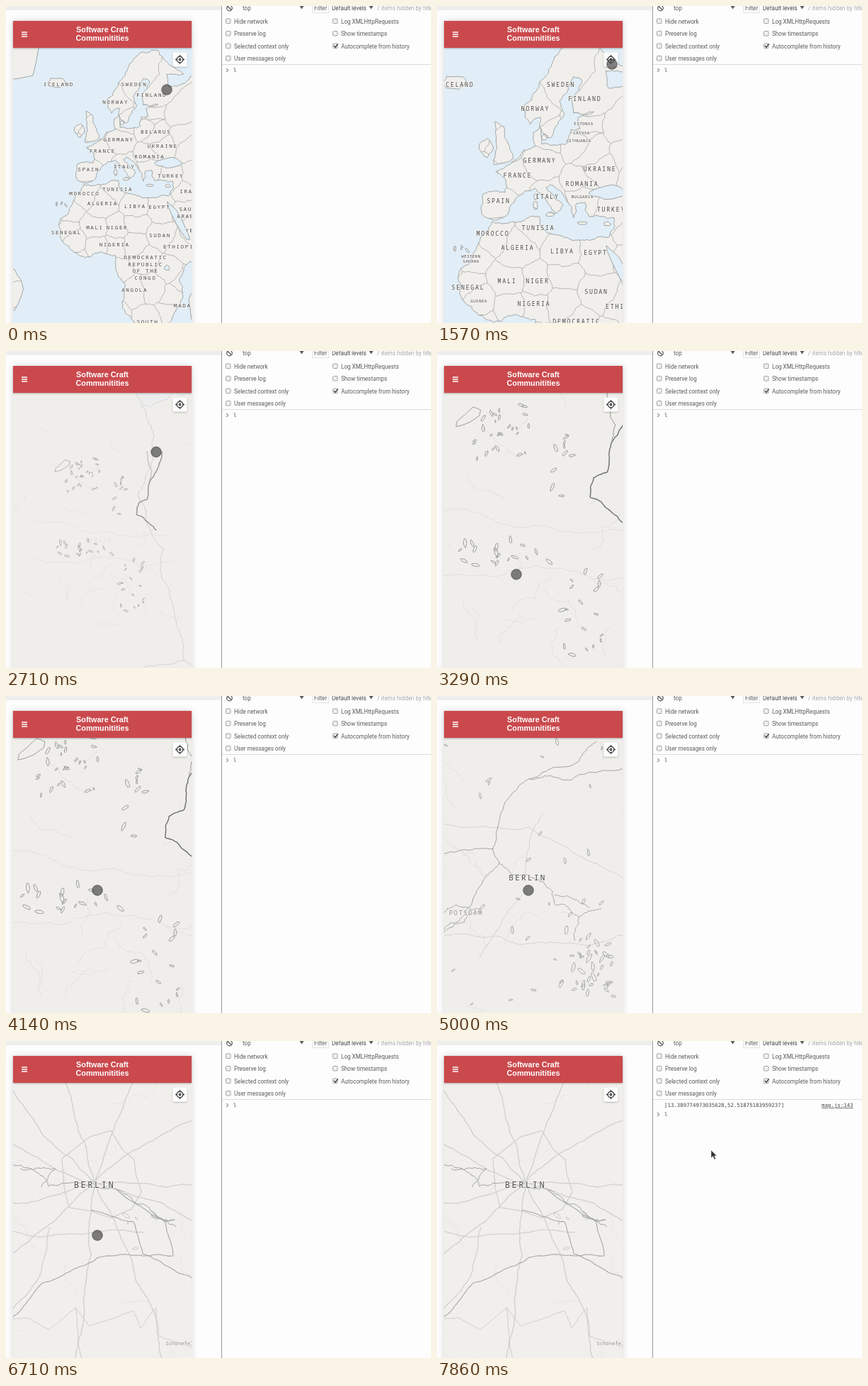
An HTML page with a canvas for the animation above (8 s loop, 600x447 px).

```html
<!DOCTYPE html>
<html lang="en">
<head>
<meta charset="utf-8">
<title>Map zoom</title>
<style>
html, body { margin: 0; width: 100%; height: 100%; overflow: hidden; background: #fdfdfd; }
canvas, svg { position: absolute; left: 0; top: 0; width: 600px; height: 447px; }
.ui { font: 8.15px Roboto, sans-serif; fill: #5c5c5c; }
.mono { font: 7.4px "DejaVu Sans Mono", monospace; fill: #444; }
.title { font: bold 10.8px "Liberation Sans", Arial, sans-serif; fill: #fff; text-anchor: middle; }
</style>
</head>
<body>
<canvas id="map" width="600" height="447"></canvas>
<svg viewBox="0 0 600 447">
  <defs><filter id="soft" x="-20%" y="-20%" width="140%" height="150%"><feDropShadow dx="0" dy="1" stdDeviation="1" flood-opacity=".3"/></filter></defs>
  <rect width="304" height="6" fill="#eeeeed"/>
  <rect x="10" y="21" width="252" height="38" fill="#ca4a4d" filter="url(#soft)"/>
  <path d="M22 37h8M22 40h8M22 43h8" stroke="#fff" stroke-width="1.4"/>
  <text class="title" x="136" y="37">Software Craft</text>
  <text class="title" x="136" y="49.3">Communitities</text>
  <rect x="235.5" y="65.5" width="20" height="20" rx="2" fill="#fdfdfd" filter="url(#soft)"/>
  <g transform="translate(245.5 75.5)" fill="none" stroke="#3c3c3c" stroke-width="1.4">
    <circle r="4.3"/>
    <path d="M0 -6.5v2.500M0 4v2.500M-6.500 0h2.500M4 0h2.500"/>
    <circle r="1.2"/>
  </g>
  <path d="M304.5 0V447" stroke="#9b9b9b"/>
  <path d="M305 82.5H600" stroke="#dcdcdc"/>
  <g class="ui">
    <circle cx="315.5" cy="3" r="3.8" fill="none" stroke="#555" stroke-width="1.2"/>
    <path d="M313 .5l5 5" stroke="#555" stroke-width="1.2"/>
    <text x="334" y="6">top</text>
    <rect x="432.5" y="-6" width="23" height="15.5" fill="none" stroke="#e2e2e2"/>
    <text x="435" y="6">Filter</text>
    <text x="460" y="6" fill="#444">Default levels</text>
    <path d="M414.5 0h6l-3 4.5zM512.5 0h6l-3 4.5z"/>
    <text x="523" y="6" fill="#a5a5a5">7 items hidden by filters</text>
    <g id="options"></g>
  </g>
  <g id="log" class="mono">
    <text x="321" y="93">[13.389774973035628,52.51875183959237]</text>
    <text x="543" y="93" text-decoration="underline">map.js:143</text>
  </g>
  <g id="prompt" class="mono">
    <path d="M311 88l3 2.5l-3 2.5" fill="none" stroke="#666"/>
    <text x="321" y="93">l</text>
  </g>
  <circle id="touch" r="7.3" fill="#444" fill-opacity=".68" stroke="#333" stroke-opacity=".6"/>
  <path id="arrow" d="M0 0v11l2.6-2.4l2 4.4l1.9-.9l-2-4.2h3.4z" fill="#333" stroke="#eee" stroke-width=".5"/>
</svg>
<script>
const $ = id => document.getElementById(id);
const ctx = $('map').getContext('2d');
const STEP = 1000 / 7, STEPS = 56;
const LAND = '#f1efeb', SEA = '#e1eef7', LINE = '#8f9294', FAINT = '#dcdbd8', ROAD = '#cfcfcd', RIVER = '#9fa2a3';

let seed = 7;
const random = () => {
  seed = (seed * 1664525 + 1013904223) % 4294967296;
  return seed / 4294967296;
};
const spread = size => (random() - .5) * size;

// Midpoint displacement makes a few key points look like natural lines.
function roughen(points, amount) {
  const out = [points[0]];
  const split = (a, b) => {
    const dx = b[0] - a[0], dy = b[1] - a[1];
    if (Math.hypot(dx, dy) < 3) return out.push(b);
    const k = spread(amount);
    const mid = [(a[0] + b[0]) / 2 - dy * k, (a[1] + b[1]) / 2 + dx * k];
    split(a, mid);
    split(mid, b);
  };
  for (let i = 1; i < points.length; i++) split(points[i - 1], points[i]);
  return out;
}

const trace = (path, points) => points.forEach(([x, y], i) => i ? path.lineTo(x, y) : path.moveTo(x, y));

// "x,y x,y; x,y ..." becomes rough lines
function shape(text, amount, { closed = false, project = p => p, path = new Path2D() } = {}) {
  for (const part of text.trim().split(';')) {
    const points = part.trim().split(/\s+/).map(p => project(p.split(',').map(Number)));
    if (closed) points.push(points[0]);
    trace(path, roughen(points, amount));
  }
  return path;
}

function blob(path, x, y, rx, ry, turn = 0, corners = 14) {
  const points = Array.from({ length: corners }, (_, i) => {
    const a = i / corners * 2 * Math.PI, r = .8 + random() * .4;
    const u = Math.cos(a) * rx * r, v = Math.sin(a) * ry * r;
    return [x + u * Math.cos(turn) - v * Math.sin(turn), y + u * Math.sin(turn) + v * Math.cos(turn)];
  });
  trace(path, points);
  path.closePath();
  return path;
}

function lakes(path, count, x, y, width, height, size) {
  for (let n = 0; n < count; n++) {
    const long = size * (.5 + random());
    blob(path, x + spread(width), y + spread(height), long, long * .35, random() * 3, 9);
  }
  return path;
}

function streams(count) {
  const path = new Path2D();
  for (let n = 0; n < count; n++) {
    const x = 130 + spread(420), y = 250 + spread(560);
    trace(path, roughen([[x, y], [x + spread(120), y + spread(120)]], .5));
  }
  return path;
}

function rays(x, y, count, length) {
  const path = new Path2D();
  for (let n = 0; n < count; n++) {
    const a = (n + spread(.5)) / count * 2 * Math.PI;
    trace(path, roughen([[x, y], [x + Math.cos(a) * length, y + Math.sin(a) * length]], .12));
  }
  return path;
}

// Borders run halfway between neighbouring centres (Voronoi cells).
function borders(sites) {
  const path = new Path2D();
  const box = [[-200, -100], [500, -100], [500, 800], [-200, 800]];
  sites.forEach((a, i) => {
    let cell = box.map(p => ({ p, owner: -1 }));
    sites.forEach((b, j) => {
      if (i === j) return;
      const side = ([x, y]) => (x - (a.x + b.x) / 2) * (b.x - a.x) + (y - (a.y + b.y) / 2) * (b.y - a.y);
      const kept = [];
      cell.forEach((c, k) => {
        const d = cell[(k + 1) % cell.length], s = side(c.p), t = side(d.p);
        if (s <= 0) kept.push(c);
        if (s <= 0 === t <= 0) return;
        const u = s / (s - t);
        kept.push({ p: c.p.map((v, n) => v + (d.p[n] - v) * u), owner: s <= 0 ? j : c.owner });
      });
      cell = kept;
    });
    cell.forEach((c, k) => {
      if (c.owner > i) trace(path, roughen([c.p, cell[(k + 1) % cell.length].p], .25));
    });
  });
  return path;
}

// Fills the gaps between named places with unnamed ones.
function fillSites(named, gap) {
  const sites = [...named];
  for (let n = 0; n < 400; n++) {
    const p = { x: 115 + spread(350), y: 360 + spread(420) };
    if (sites.every(s => Math.hypot(s.x - p.x, s.y - p.y) > gap)) sites.push(p);
  }
  return sites;
}

const mercator = ([lon, lat]) => [102.4 + 4.11 * lon,
  461 - 4.11 * 180 / Math.PI * Math.log(Math.tan(Math.PI / 4 + lat * Math.PI / 360))];

const northCoast = `60,68 44,66 40,64.5 34,64 33,66.5 41,66.5 29,70.5 20,70 13,66 9,63.5 5,61 7,58 10.5,59.3
  12.8,55.5 14.2,55.5 16.7,58.5 18.8,60 17.2,62 22,65.7 25,65 21.3,62.5 22,60 29,60.2 23.5,59.2 24.2,57.2
  21,57 20.5,54.6 14,54 11,54.2 10.5,57.5 8.2,56.5 8.8,54 4.8,53 1.6,50.8`;
const southCoast = `-1.5,49.4 -4.7,48.4 -1.2,46 -1.5,43.4 -9,43 -9,37.2 -5.5,36 -.5,37.7 0,39.5 3.2,42.5 8.7,44.4
  12.2,41.7 15.8,38 18.4,40 12.5,44.5 14,45.3 19.3,42 22,36.7 23,40.5 26,40.8 27.3,37 36,36.8 34.3,31.3`;
const africaCoast = `30,31.2 20,31 11,33.6 10.3,37 -2,35.1 -6,35.6 -9.8,31.4 -17,21 -17,14 -13,9 -8,4.6 2,6.3
  9,4.5 9,-1 13.5,-9 12,-17 18,-34 30,-32 35.5,-24 40.5,-15 39,-6 45,2 60,12`;
const britain = '-5.5,50 1.3,51.2 0,53.5 -2,57.6 -5,58.5 -4.5,54 -5,51.7';

function places(text, style) {
  return text.split(';').map(row => {
    const [name, x, y] = row.trim().split(',');
    return { name, x: +x, y: +y, gap: .21, ...style };
  });
}
const countryStyle = { size: zoom => 7.6 + 1.6 * zoom, max: 2.4 };
const countries = [
  ...places(`ICELAND,29,112;SWEDEN,175,112;FINLAND,209,132;NORWAY,139,146;GERMANY,145,219;FRANCE,114,240;
    UKRAINE,230,231;ROMANIA,205,252;ITALY,156,270;SPAIN,87,276;TURKEY,246,288;TUNISIA,143,314;MOROCCO,79,322;
    ALGERIA,114,342;LIBYA,177,347;EGYPT,224,349;SENEGAL,44,398;MALI,99,389;NIGER,142,389;NIGERIA,137,421;
    SUDAN,225,404;ETHIOPIA,265,425;DEMOCRATIC/REPUBLIC/OF THE/CONGO,197,446;ANGOLA,176,509;MADAGASCAR,294,539;
    SOUTH,201,570;IRAN,280,318;YEMEN,295,394;SAUDI/ARABIA,283,353`, countryStyle),
  ...places('BELARUS,217,203', { ...countryStyle, max: .3 }),
  ...places('ESTONIA,207,166;LATVIA,204,179;LITHUANIA,200,190;BULGARIA,205,269;WESTERN/SAHARA,48,353;GUINEA,59,416',
    { size: 6, gap: .05, min: .3, max: 2.4 }),
];

const land = shape(`${northCoast} ${southCoast} ${africaCoast}; ${britain}`, .3, { closed: true, project: mercator });
blob(land, 69, 200, 9, 12);       // Ireland
blob(land, 26, 107, 18, 9);       // Iceland
blob(land, 139, 281, 3, 6);       // Sardinia
blob(land, 139, 269, 2, 4);       // Corsica
blob(land, 160, 294, 6, 3);       // Sicily
blob(land, 205, 306, 6, 2);       // Crete
blob(land, 240, 307, 5, 3);       // Cyprus
blob(land, 152, 185, 4, 4);       // Zealand
blob(land, -60, 45, 55, 55);      // Greenland
blob(land, -62, 507, 22, 40);     // South America
blob(land, 295, 541, 14, 30);     // Madagascar
lakes(land, 4, 35, 341, 24, 8, 3);

const innerSeas = new Path2D();
blob(innerSeas, 242, 263, 24, 10);      // Black Sea
blob(innerSeas, 262, 377, 6, 44, -.5);  // Red Sea
blob(innerSeas, 238, 466, 5, 5);        // Lake Victoria

const danishIsles = shape('95,-100 117,62 120,95 138,120 163,116 168,97 194,90 206,59 230,-100', .25, { closed: true });
blob(danishIsles, 54, 122, 10, 18);
blob(danishIsles, 92, 110, 19, 27);
blob(danishIsles, 77, 159, 15, 7);
blob(danishIsles, 180, 133, 7, 6);

const line = (path, stroke = LINE, width = .8, clip) => ({ path, stroke, width, clip });
const area = (path, fill, stroke = LINE) => ({ path, fill, stroke, width: .8 });

// Each layer has its own zoom and anchor, and covers the one before it.
const layers = [
  { zoom: .454, at: [157.3, 206.4], from: -9, ground: SEA,
    parts: [area(land, LAND), line(borders(fillSites(countries, 33)), '#999b9c', .7, land), area(innerSeas, SEA)],
    labels: countries },
  { zoom: 3.2, at: [137, 267], from: 2.2, ground: LAND,
    parts: [
      area(shape(`62,-100 62,59 40,90 34,110 42,150 34,165 62,180 105,176 130,168 137,158 160,192 225,165 262,148
        400,110 400,-100; -80,-60 -20,90 -8,190 -200,190`, .35, { closed: true }), SEA),
      area(danishIsles, LAND),
      line(shape(`160,192 166,215 158,240 172,270 183,330 103,365 150,432 130,470;
        183,330 215,338 236,352 300,375; 150,432 205,430 225,417 300,430`, .25), '#868a8d', 1),
    ],
    labels: [
      ...places('DENMARK,45,91;GERMANY,43,321', { size: 12.6 }),
      ...places('HAMBURG,42,216;BERLIN,137,265;PRAGUE,167,360;FRANKFURT,6,373;VIENNA,222,441', { size: 7.8, color: '#b4babf' }),
    ] },
  { zoom: 5.3, at: [129, 274], from: 4.3, ground: '#f0eeea',
    parts: [
      line(streams(26), FAINT, .7),
      line(shape('-20,305 120,306 300,310; -20,222 100,244 300,255', .2), FAINT),
      line(shape('262,242 232,213 216,206 221,179 240,171 246,130 262,105 275,60', .15), '#6c6f71', 1.4),
      line(shape('241,59 252,104 246,130', .25), '#85888a', .9),
      line([[1, 45, 92, 4, 4, 14], [26, 90, 115, 90, 80, 3.5], [10, 175, 150, 50, 110, 4], [18, 85, 285, 150, 40, 4.5],
        [18, 205, 375, 60, 130, 4]].reduce((path, group) => lakes(path, ...group), new Path2D()), '#85888a', .8),
    ],
    labels: [] },
  { zoom: 6.4, at: [129, 274], from: 5.65, ground: '#f0eeea',
    parts: [
      line(streams(34), FAINT, .7),
      line(shape('-20,175 130,185 200,225 300,290; -20,345 120,350 300,335; 125,250 135,190 150,165; 120,280 60,370', .15), ROAD, .9),
      line(shape('320,112 245,105 130,117 90,165 78,215 88,235 50,290 10,333 -40,340; 130,117 200,92 225,65; -30,224 80,215', .2), RIVER, 1),
      line(shape('88,236 150,262 200,312 232,300; 165,280 215,298; 200,312 195,345; 10,305 62,300 10,330', .35), RIVER, .9),
      line(lakes(lakes(new Path2D(), 34, 210, 368, 75, 100, 4.5), 30, 130, 250, 240, 380, 3.5), '#969a9b', .8),
    ],
    labels: [...places('BERLIN,128,257', { size: 11 }), ...places('POTSDAM,41,307', { size: 8.5, color: '#8d8d8d' })] },
  { zoom: 8.43, at: [129, 274], from: 7, ground: '#f1efeb',
    parts: [
      line(streams(20), '#e3e2df', .7),
      area(blob(new Path2D(), -11, 96, 8, 22, .4), '#e4eef4', '#cdd5d9'),
      line(rays(125, 200, 11, 400), ROAD, 1.3),
      line(blob(new Path2D(), 132, 188, 62, 54), ROAD, 1.2),
      line(shape('-40,264 110,272 195,270; 62,262 48,330 -30,420', .12), ROAD, 1.2),
      line(shape('-40,176 40,182 60,205 98,198 155,208 205,240 240,262; 20,180 70,180 50,206; 205,240 238,252 205,246', .3), RIVER, 1),
      line(shape('-40,430 50,342 130,305 236,303 225,255 155,208; 120,238 180,255 193,300 320,372', .12), '#a6a8a8', 1.1),
      line(shape('-40,398 30,390 60,407 98,376 118,402 180,380 190,405 212,376 214,415 262,432; 98,376 110,470 160,472', .06), '#c9c9c7', .9),
      line(lakes(new Path2D(), 5, 190, 290, 80, 120, 4), '#b5b8b9', .7),
    ],
    labels: [
      ...places('BERLIN,125,204', { size: 12 }),
      ...places('Schönefeld,247,427;Ahrensfelde,319,100', { size: 7, color: '#8b8b8b', gap: .02 }),
    ] },
];

// step, zoom, anchor x, anchor y
const camera = [
  [8, 0, 168, 180], [11, .454, 157.3, 206.4], [15, 3.2, 137, 267], [23, 5.3, 129, 274],
  [31, 5.5, 129, 274], [35, 6.4, 129, 274], [41, 8, 129, 274], [46, 8.43, 129, 274],
];
// step, x, y
const pointer = [
  [1, 227, 118], [5, 247, 82], [17, 247, 82], [23, 112, 315], [28, 129, 274], [49, 129, 274], [55, 387, 154],
];

// Monotone cubic through the keys, held at both ends
function track(keys, step) {
  let i = 0;
  while (i < keys.length - 2 && step >= keys[i + 1][0]) i++;
  const a = keys[i], b = keys[i + 1], h = b[0] - a[0];
  const u = Math.min(1, Math.max(0, (step - a[0]) / h));
  return a.slice(1).map((start, n) => {
    const slope = k => keys[k] && keys[k + 1]
      ? (keys[k + 1][n + 1] - keys[k][n + 1]) / (keys[k + 1][0] - keys[k][0]) : 0;
    const tangent = k => {
      const p = slope(k - 1), q = slope(k);
      return p * q > 0 ? 2 * p * q / (p + q) : 0;
    };
    return start + (b[n + 1] - start) * u * u * (3 - 2 * u)
      + h * u * (1 - u) * ((1 - u) * tangent(i) - u * tangent(i + 1));
  });
}

function drawLabel({ name, size, gap, color = '#4a4a4a' }, zoom, x, y) {
  const px = typeof size === 'function' ? size(zoom) : size;
  ctx.font = `${px}px "Noto Sans Mono", monospace`;
  ctx.letterSpacing = `${px * gap}px`;
  ctx.strokeStyle = '#f4f3f0';
  ctx.lineWidth = 1.6;
  ctx.fillStyle = color;
  name.split('/').forEach((text, row) => {
    ctx.strokeText(text, x, y + row * px * 1.25);
    ctx.fillText(text, x, y + row * px * 1.25);
  });
}

function drawLayer(layer, zoom, x, y) {
  const scale = 2 ** (zoom - layer.zoom), [ax, ay] = layer.at;
  ctx.globalAlpha = Math.max(0, Math.min(1, (zoom - layer.from) / .4));
  ctx.fillStyle = layer.ground;
  ctx.fillRect(10, 59, 252, 388);
  ctx.save();
  ctx.translate(x, y);
  ctx.scale(scale, scale);
  ctx.translate(-ax, -ay);
  for (const { path, fill, stroke, width, clip } of layer.parts) {
    ctx.save();
    if (clip) ctx.clip(clip);
    if (fill) { ctx.fillStyle = fill; ctx.fill(path); }
    ctx.strokeStyle = stroke;
    ctx.lineWidth = width / scale;
    ctx.stroke(path);
    ctx.restore();
  }
  ctx.restore();
  for (const label of layer.labels)
    if (!(zoom < label.min || zoom > label.max))
      drawLabel(label, zoom, x + (label.x - ax) * scale, y + (label.y - ay) * scale);
}

function draw(step) {
  const [zoom, x, y] = track(camera, step);
  ctx.clearRect(0, 0, 600, 447);
  ctx.save();
  ctx.shadowColor = 'rgba(0,0,0,.16)';
  ctx.shadowBlur = 9;
  ctx.fillStyle = LAND;
  ctx.fillRect(10, 21, 252, 440);
  ctx.restore();
  ctx.save();
  ctx.beginPath();
  ctx.rect(10, 59, 252, 388);
  ctx.clip();
  ctx.lineJoin = 'round';
  ctx.textAlign = 'center';
  ctx.textBaseline = 'middle';
  const base = layers.findLastIndex(l => zoom >= l.from + .4);
  layers.slice(base).filter(l => zoom > l.from).forEach(l => drawLayer(l, zoom, x, y));
  ctx.restore();

  const [px, py] = track(pointer, step), onMap = px < 262, logged = step >= 51;
  const show = (id, on) => $(id).style.display = on ? '' : 'none';
  show('touch', onMap);
  show('arrow', !onMap);
  show('log', logged);
  for (const id of ['touch', 'arrow']) $(id).setAttribute('transform', `translate(${px} ${py})`);
  $('prompt').setAttribute('transform', `translate(0 ${logged ? 13 : 0})`);
}

const options = [
  ['Hide network', 'Log XMLHttpRequests'], ['Preserve log', 'Show timestamps'],
  ['Selected context only', 'Autocomplete from history'], ['User messages only'],
];
$('options').innerHTML = options.flatMap((row, r) => row.map((text, c) => {
  const x = c ? 461.5 : 310.5, y = 18 + r * 17.5;
  const mark = text.startsWith('Auto') ? `<path d="M${x + 1.5} ${y + 3}l2 2.3l3.5-5" fill="none" stroke="#333" stroke-width="1.3"/>` : '';
  return `<rect x="${x}" y="${y}" width="6.5" height="6.5" rx="1" fill="#f0f0f0" stroke="#a2a2a2"/>${mark}
    <text x="${x + 11.5}" y="${y + 6.8}">${text}</text>`;
})).join('');

// Steps fall on times rounded to 10 ms, so allow a little slack.
let shown = -1;
function tick(now) {
  const step = Math.floor(now / STEP + .05) % STEPS;
  if (step !== shown) draw(shown = step);
  requestAnimationFrame(tick);
}
draw(0);
requestAnimationFrame(tick);
</script>
</body>
</html>
```
